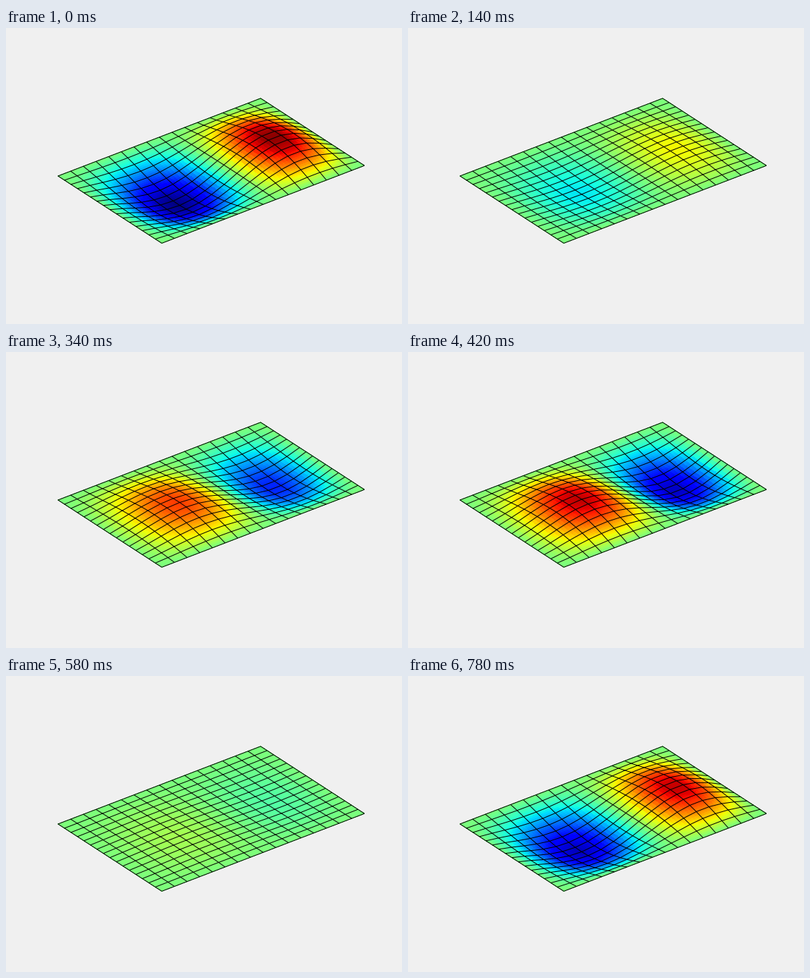
A matplotlib script that plays this animation: 560x420 px, repeating every 800 ms.

```python
import numpy as np
import matplotlib.pyplot as plt
from matplotlib.animation import FuncAnimation
from matplotlib.collections import LineCollection, PolyCollection

W, H, DPI = 560, 420, 100
FRAMES, INTERVAL = 40, 20
CELLS, SUB = 16, 4             # grid cells per side, colour patches per cell
HEIGHT = 22.5                  # peak displacement in pixels
SKEW = 1.17                    # pushes the lobes away from the left corner
CORNER = np.array([73.5, 210.0])
LONG = np.array([286.6, -110.2])
SHORT = np.array([146.8, 95.4])

fig = plt.figure(figsize=(W / DPI, H / DPI), dpi=DPI, facecolor="#f0f0f0")
ax = fig.add_axes([0, 0, 1, 1])
ax.set_xlim(0, W)
ax.set_ylim(H, 0)
ax.axis("off")


def mode(u, v):
    """Skewed membrane mode with two lobes along u and one along v."""
    return -np.sin(2 * np.pi * u ** SKEW) * np.sin(np.pi * v ** SKEW)


def refine(grid):
    """Interpolate linearly from the cell corners to the patch corners."""
    coarse = np.linspace(0, 1, CELLS + 1)
    fine = np.linspace(0, 1, CELLS * SUB + 1)
    rows = np.array([np.interp(fine, coarse, row) for row in grid])
    return np.array([np.interp(fine, coarse, col) for col in rows.T]).T


def quads(points):
    corners = (points[:-1, :-1], points[:-1, 1:], points[1:, 1:], points[1:, :-1])
    return np.stack(corners, axis=2).reshape(-1, 4, 2)


def project(u, v, z):
    flat = CORNER + u[..., None] * LONG + v[..., None] * SHORT
    flat[..., 1] -= HEIGHT * z
    return flat


def amplitude(frame):
    """Triangle wave from 1 down to -1 and back."""
    half = FRAMES / 2
    return abs(frame - half) / (half / 2) - 1


ticks = np.linspace(0, 1, CELLS + 1)
U, V = np.meshgrid(ticks, ticks)
Z = mode(U, V)
fine_u, fine_v, fine_z = refine(U), refine(V), refine(Z)
tint = (fine_z[:-1, :-1] + fine_z[:-1, 1:] + fine_z[1:, 1:] + fine_z[1:, :-1]).ravel() / 4

faces = PolyCollection([], cmap=plt.get_cmap("jet"), edgecolors="none",
                       antialiaseds=False)
faces.set_clim(-1, 1)
mesh = LineCollection([], colors="black", linewidths=72 / DPI)
ax.add_collection(faces, autolim=False)
ax.add_collection(mesh, autolim=False)


def draw(frame):
    a = amplitude(frame)
    faces.set_verts(quads(project(fine_u, fine_v, a * fine_z)))
    faces.set_array(a * tint)
    nodes = project(U, V, a * Z)
    mesh.set_segments(list(nodes) + list(nodes.transpose(1, 0, 2)))
    return faces, mesh


anim = FuncAnimation(fig, draw, frames=FRAMES, interval=INTERVAL,
                     repeat=True, repeat_delay=0, blit=False)
plt.show()
```
